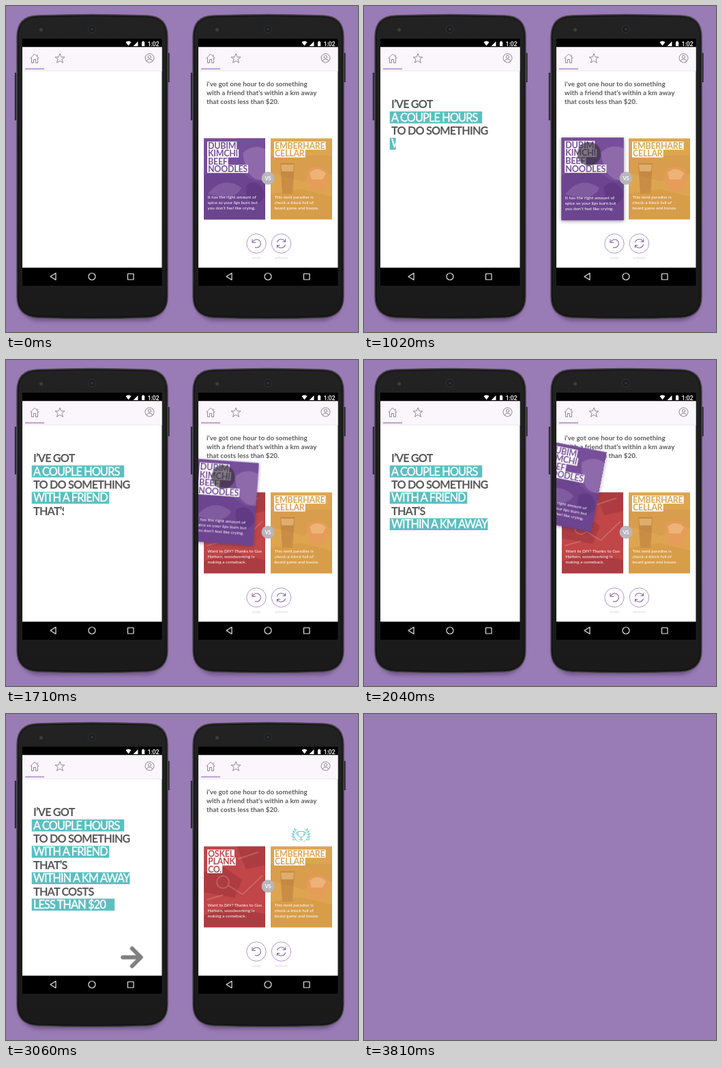
Write an HTML page that moves like this. It is 516 px wide and 479 px high and loops after 3840 ms.

```html
<!DOCTYPE html>
<html lang="en">
<head>
<meta charset="utf-8">
<title>Two phones</title>
<style>
@property --t { syntax: '<number>'; inherits: true; initial-value: 0; }
html, body { margin: 0; width: 100%; height: 100%; overflow: hidden; background: #997bb5; }
svg { display: block; width: 516px; height: 479px; font-family: Lato, 'Open Sans', sans-serif; }
#scene, #scene * { animation-duration: 3840ms; animation-iteration-count: infinite; animation-timing-function: linear; }
#scene { animation-name: clock, leave; }
@keyframes clock { to { --t: 3840; } }
@keyframes leave { 0%, 92.2% { opacity: 1; } 98.9%, 100% { opacity: 0; } }

.line { clip-path: inset(0 calc(100% - 100% * clamp(0, (var(--t) - var(--s)) / 260, 1)) 0 0); }
.line text { font-size: 16.3px; letter-spacing: -.85px; }
.plain { fill: #58585a; font-weight: 700; }
.mark rect { fill: #5cbfc1; }
.mark text { fill: #fff; font-weight: 400; stroke: #fff; stroke-width: .4px; }

#swipe { transform-origin: 335px 254px; animation-name: swipe; }
@keyframes swipe {
  0%, 16.4% { transform: none; }
  23.4%, 39% { transform: translate(0, 0) rotate(0) scale(1.02); }
  44.5% { transform: translate(-14px, -45px) rotate(4deg) scale(1.02); }
  53.1% { transform: translate(-34px, -68px) rotate(11deg) scale(1); }
  58.6%, 100% { transform: translate(-122px, -124px) rotate(18deg) scale(1); }
}
#lift { opacity: 0; animation-name: lift; }
@keyframes lift { 0%, 16.4% { opacity: 0; } 23.4%, 100% { opacity: 1; } }
#press { opacity: 0; animation-name: press; }
@keyframes press { 0%, 16.4% { opacity: 0; } 23.4%, 44.5% { opacity: 1; } 50%, 100% { opacity: 0; } }
#tap { opacity: 0; animation-name: tap; }
@keyframes tap { 0%, 67.5% { opacity: 0; } 71%, 75% { opacity: .8; } 79%, 100% { opacity: 0; } }
#cup { transform-origin: 432.5px 179px; animation-name: cup; }
@keyframes cup { 0%, 72% { opacity: 0; transform: scale(.6); } 79%, 100% { opacity: 1; transform: none; } }
#arrow { animation-name: arrow; }
@keyframes arrow {
  0%, 73.4% { opacity: 0; transform: translateX(-82px); animation-timing-function: ease-out; }
  83.5%, 100% { opacity: 1; transform: none; }
}
.ask { font-size: 9.8px; font-weight: 700; fill: #5c5c5e; letter-spacing: .05px; }
.name { font-size: 12.4px; font-weight: 700; letter-spacing: -.2px; }
.note { font-size: 6.3px; fill: #fff; letter-spacing: .05px; }
.hint { font-size: 6px; fill: #d9cfe3; text-anchor: middle; }
</style>
</head>
<body>
<svg viewBox="0 0 516 479">
  <defs>
    <filter id="soft" x="-20%" y="-20%" width="140%" height="140%"><feGaussianBlur stdDeviation="2.5"/></filter>
    <linearGradient id="shell" x2="0" y2="1">
      <stop stop-color="#222223"/>
      <stop offset="1" stop-color="#1a1a1b"/>
    </linearGradient>
    <clipPath id="screen"><rect x="282" y="61" width="204.500" height="323"/></clipPath>
    <clipPath id="frame"><rect x="290" y="194.500" width="90" height="119"/></clipPath>
    <g id="phone">
      <rect x="18" y="22" width="217" height="441" rx="31" fill="#4c3562" opacity=".5" filter="url(#soft)"/>
      <path d="M14 98V168M238.500 69V112" stroke="#2b2b2d" stroke-width="2.400"/>
      <path d="M16 45Q16 15 46 14Q126 11 207 14Q237 15 237 45V427Q237 456 207 458Q126 461 46 458Q16 456 16 427Z" fill="url(#shell)" stroke="#47454a" stroke-width="1.400"/>
      <path d="M18 45Q18 17 46 16Q126 13 207 16Q235 17 235 45V427Q235 454 207 456Q126 459 46 456Q18 454 18 427Z" fill="none" stroke="#111"/>
      <circle cx="51.500" cy="35" r="2.500" fill="#3e3e41"/>
      <circle cx="126" cy="34" r="5.500" fill="#1c1c1e" stroke="#353537"/>
      <circle cx="126" cy="34" r="2" fill="#2c3640"/>
      <rect x="24" y="48" width="204.500" height="363"/>
      <rect x="24" y="60.500" width="204.500" height="324" fill="#fff"/>
      <rect x="24" y="60.500" width="204.500" height="34.500" fill="#fbf6fb"/>
      <path d="M24 95.500H228.500" stroke="#eee9f0"/>
      <g fill="#fff">
        <path d="M175.500 53Q179.500 50 183.500 53L179.500 58.500ZM186.500 59L193.500 52V59ZM199 52.500H200.200V51.500H201.800V52.500H203.200V59H199Z"/>
        <text x="207.500" y="58.500" font-size="9" font-weight="500" font-family="Roboto, sans-serif" letter-spacing="-.2">1:02</text>
      </g>
      <g fill="none" stroke="#837d88" stroke-width=".9" stroke-linejoin="round">
        <path d="M35.500 77L42 70.500L48.500 77M37.500 76V83.500H40.500V78.500H43.500V83.500H46.500V76M46 74.500V71.500"/>
        <path d="M79 70L81 75H86L82 78.300L83.500 83.500L79 80.500L74.500 83.500L76 78.300L72 75H77Z"/>
        <circle cx="210.500" cy="76.500" r="6.500"/>
        <circle cx="210.500" cy="74.800" r="2.200"/>
        <path d="M206.500 81Q207 78 210.500 78T214.500 81"/>
      </g>
      <rect x="28" y="91.500" width="28" height="1.800" fill="#b095ca"/>
      <g fill="none" stroke="#e6e6e6" stroke-width="1.200" stroke-linejoin="round">
        <path d="M73 392.500V402.500L65 397.500Z"/>
        <circle cx="126" cy="397.500" r="5"/>
        <rect x="178.500" y="393.500" width="8.500" height="8.500"/>
      </g>
    </g>
  </defs>

  <g id="scene">
    <use href="#phone"/>
    <use href="#phone" x="258"/>

    <g id="lines"></g>
    <path id="arrow" d="M187 357.500H213M200.500 344.500L213.500 357.500L200.500 370.500" fill="none" stroke="#616163" stroke-width="6" stroke-linecap="round" stroke-linejoin="round"/>

    <g clip-path="url(#screen)">
      <g class="ask">
        <text x="294" y="118">i've got one hour to do something</text>
        <text x="294" y="131">with a friend that's within a km away</text>
        <text x="294" y="144">that costs less than $20.</text>
      </g>

      <g id="wood">
        <g clip-path="url(#frame)">
          <rect x="290" y="194" width="90" height="120" fill="#c04648"/>
          <g fill="#8f2f38" opacity=".4">
            <path d="M290 232L320 225L346 244L335 270L290 262ZM338 194H380V222L352 228Z"/>
            <path d="M290 296L330 282L380 294V314H290Z"/>
          </g>
          <g fill="none" stroke="#e0908a" stroke-width="2" opacity=".4">
            <circle cx="318" cy="247" r="9"/>
            <path d="M326 252L347 265L376 237M340 213L370 203M294 273L318 266"/>
          </g>
        </g>
      </g>

      <g id="pub">
        <g clip-path="url(#frame)" transform="translate(98)">
          <rect x="290" y="194" width="90" height="120" fill="#dea550"/>
          <path d="M290 220H380V248L362 240L339 258L290 245Z" fill="#cb8a48" opacity=".3"/>
          <path d="M304 231H325L322 276H307Z" fill="#b06f38" opacity=".45"/>
          <path d="M305 233H324L323 243H306Z" fill="#efc888" opacity=".6"/>
          <path d="M342 253Q342 235 359 236T376 254L368 272H349Z" fill="#ec9a5e" opacity=".65"/>
          <path d="M347 245Q359 234 371 246L366 255H350Z" fill="#f6c996" opacity=".5"/>
          <path d="M290 276L335 269L380 280V314H290Z" fill="#cc913f" opacity=".4"/>
        </g>
      </g>
      <circle id="tap" cx="432" cy="242" r="17" fill="#443c42" opacity=".5"/>

      <g id="swipe">
        <rect id="lift" x="290" y="196" width="90" height="119" fill="#3c2850" fill-opacity=".5" filter="url(#soft)"/>
        <g id="rice">
          <g clip-path="url(#frame)">
            <rect x="290" y="194" width="90" height="120" fill="#774e9a"/>
            <path d="M290 250Q322 226 350 248T380 240V314H290Z" fill="#5a367e" opacity=".4"/>
            <path d="M347 216Q362 202 380 210V256Q352 259 347 216Z" fill="#aa8cbf" opacity=".45"/>
            <path d="M296 276Q318 248 345 267Q335 289 296 276Z" fill="#a07eb8" opacity=".4"/>
            <path d="M352 264Q366 253 376 268T364 293Q350 285 352 264Z" fill="#4c2b6e" opacity=".35"/>
          </g>
        </g>
        <circle id="press" cx="330" cy="218" r="17" fill="#352f38" fill-opacity=".65"/>
      </g>

      <circle cx="384" cy="253" r="9.500" fill="#b9b5bd"/>
      <text x="384" y="255.600" font-size="7.500" font-weight="700" fill="#fff" text-anchor="middle">VS</text>

      <g fill="none" stroke="#a98cc4" stroke-width=".9">
        <circle cx="367" cy="349" r="14.200"/>
        <circle cx="403.500" cy="349" r="14.200"/>
        <g stroke="#87659f" stroke-width="1.100">
          <path d="M362 346.500A6 6 0 1 1 365 354.500M361 342.500V347.500H366"/>
          <path d="M397.500 347.500A6.200 6.200 0 0 1 409 346M409.500 350.500A6.200 6.200 0 0 1 398 352M409.500 342.500V346.500H405.500M397.500 355.500V351.500H401.500"/>
        </g>
      </g>
      <text class="hint" x="367" y="372">undo</text>
      <text class="hint" x="403.500" y="372">refresh</text>

      <g id="cup" fill="none" stroke="#63bdc4" stroke-width=".9">
        <path d="M428 172.500H437V176Q437 181 432.500 181T428 176ZM428 174H425.500Q425.500 178 429 178M437 174H439.500Q439.500 178 436 178M432.500 181V184.500M429.500 185H435.500"/>
        <g id="leaves" stroke-width=".7"><path d="M424 169Q416 180 429 188"/></g>
      </g>
    </g>
  </g>
</svg>
<script>
const $ = id => document.getElementById(id);

function add(parent, tag, attrs, text = '') {
  const el = document.createElementNS('http://www.w3.org/2000/svg', tag);
  for (const key in attrs) el.setAttribute(key, attrs[key]);
  el.textContent = text;
  return parent.appendChild(el);
}

// Sentence lines: text, reveal time, width of the highlight (if any)
[
  ["I’VE GOT", 130],
  ['A COUPLE HOURS', 400, 136],
  ['TO DO SOMETHING', 720],
  ['WITH A FRIEND', 1000, 114],
  ['THAT’S', 1480],
  ['WITHIN A KM AWAY', 1760, 144],
  ['THAT COSTS', 2050],
  ['LESS THAN $20', 2310, 122],
].forEach(([text, start, width], i) => {
  const y = 150.2 + i * 19.4;
  const g = add($('lines'), 'g', { class: 'line ' + (width ? 'mark' : 'plain'), style: `--s:${start}` });
  if (width) add(g, 'rect', { x: 37.5, y: y - 14.7, width, height: 17.6 });
  add(g, 'text', { x: 40, y }, text);
});

function fillCard(id, x, color, title, note) {
  const card = $(id);
  title.forEach((word, i) => {
    const y = 209.7 + i * 11.4;
    const plate = add(card, 'rect', { x, y: y - 10.4, height: 11.8, fill: '#fff' });
    const label = add(card, 'text', { class: 'name', x: x + 1, y, fill: color }, word);
    plate.setAttribute('width', label.getComputedTextLength() + 2);
  });
  note.forEach((row, i) => add(card, 'text', { class: 'note', x: x + .5, y: 283.3 + i * 7.8 }, row));
}
fillCard('rice', 295, '#774e9a', ['DUBIM', 'KIMCHI', 'BEEF', 'NOODLES'],
  ['It has the right amount of', 'spice so your lips burn but', 'you don’t feel like crying.']);
fillCard('wood', 295, '#c04648', ['OSKEL', 'PLANK', 'CO.'],
  ['Want to DIY? Thanks to Gus', 'Harlsen, woodworking is', 'making a comeback.']);
fillCard('pub', 393, '#dea550', ['EMBERHARE', 'CELLAR'],
  ['This nerd paradise is', 'chock-a-block full of', 'board game and booze.']);

// Laurel wreath, mirrored about the cup
for (let i = 0; i < 5; i++) {
  const a = 2.35 + i * .3;
  const x = 432.5 + 11 * Math.cos(a), y = 178 - 10 * Math.sin(a) + i * .9;
  add($('leaves'), 'path', { d: `M${x} ${y}q-2.500 -1 -2.500 -2.500q2.500 0 2.500 2.500q2.500 -1 2 -2.500` });
}
const mirror = $('leaves').cloneNode(true);
mirror.removeAttribute('id');
mirror.setAttribute('transform', 'matrix(-1 0 0 1 865 0)');
$('cup').append(mirror);
</script>
</body>
</html>
```
